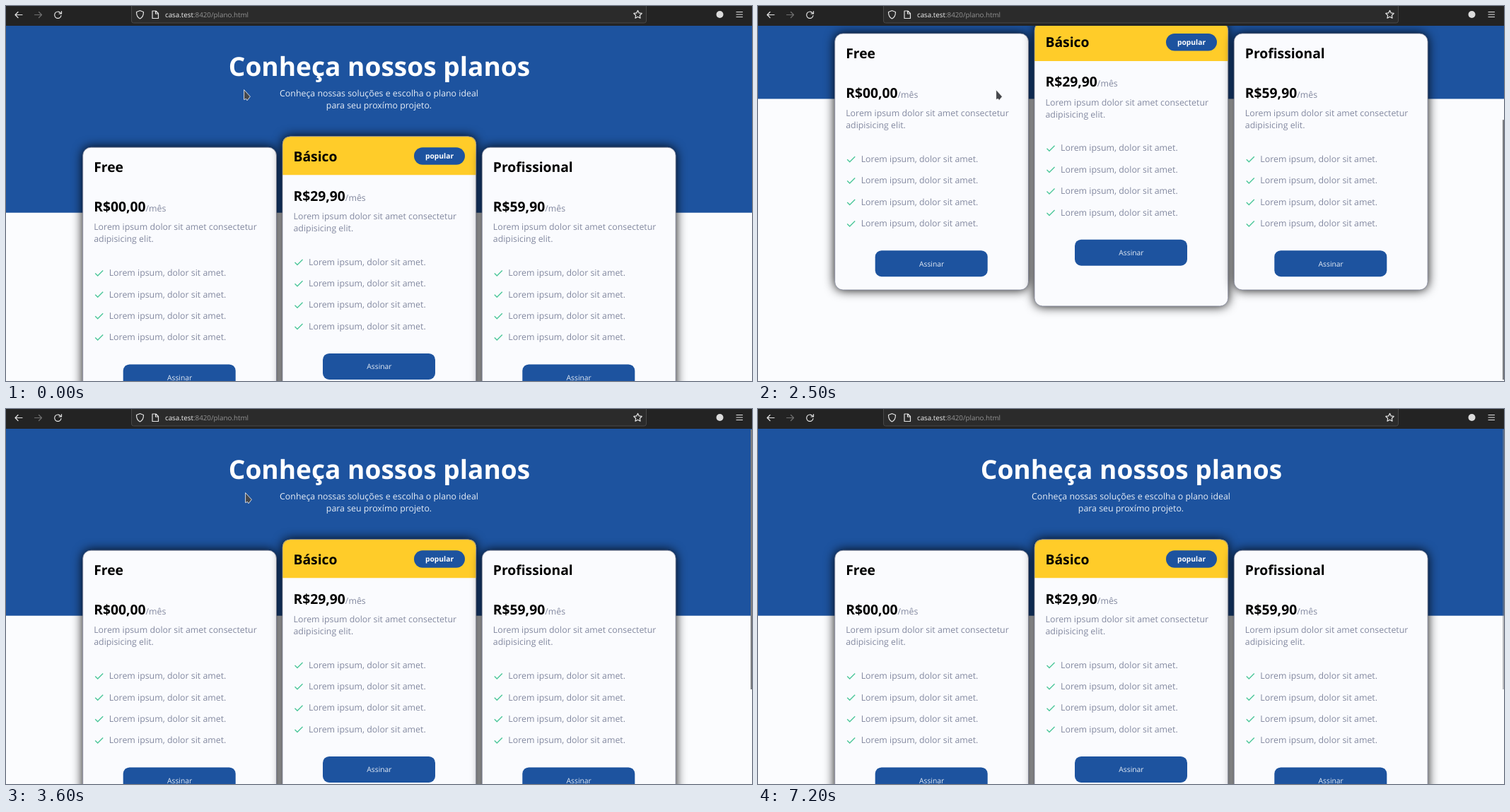
Animation, 1055 px wide and 531 px high, one loop 7.3 s. Source, as an HTML page:

```html
<!DOCTYPE html>
<html lang="pt-BR">
<head>
<meta charset="utf-8">
<title>Planos</title>
<style>
  html, body { margin: 0; width: 100%; height: 100%; overflow: hidden; background: #fbfcfe; }
  svg { display: block; }
  text { font: 12.36px "Open Sans", "Noto Sans", sans-serif; text-rendering: geometricPrecision; white-space: pre; }
  .mid { text-anchor: middle; }
  .hero { font-size: 37.1px; font-weight: 700; fill: #fff; }
  .sub { fill: #e6edf6; }
  .big { font-size: 19.3px; font-weight: 700; fill: #000; }
  .muted { fill: #8389a0; font-size: 12.36px; font-weight: 400; }
  .small { font-size: 10.3px; fill: #e6edf6; }
  .pill { font-size: 10.3px; font-weight: 700; fill: #fff; }
  .url { font-size: 9.8px; fill: #f2f2f2; }
  .blue { fill: #1d539f; }
  .panel { fill: #fafbfe; filter: drop-shadow(0 0 7.7px #000); }
  .edge { fill: none; stroke: #868a9e; stroke-width: .8; }
  .tick { fill: none; stroke: #4cc79a; stroke-width: 1.4; }
  .icons { fill: none; stroke: #e4e4e4; stroke-width: 1.2; stroke-linecap: round; stroke-linejoin: round; }
</style>
</head>
<body>
<svg width="1055" height="531" viewBox="0 0 1055 531">
  <rect width="1055" height="531" fill="#fbfcfe"/>
  <g id="page">
    <rect class="blue" width="1055" height="292.7"/>
    <text class="hero mid" x="528" y="98.5">Conheça nossos planos</text>
    <text class="sub mid" x="527.5" y="127.5">Conheça nossas soluções e escolha o plano ideal</text>
    <text class="sub mid" x="527.5" y="144.5">para seu proxímo projeto.</text>
    <g id="cards"></g>
  </g>
  <rect id="thumb" x="1053" y="29" width="2" height="368" fill="#7c7e82"/>

  <rect width="1055" height="28" fill="#232323"/>
  <rect x="177.5" y="-4" width="728" height="28" rx="3" fill="#2b2b2b" stroke="#484848"/>
  <text class="url" x="225" y="15.6">casa.test<tspan fill="#949494">:8420/plano.html</tspan></text>
  <g class="icons">
    <path id="arrow" d="M23 12.5H13m4-4l-4 4 4 4"/>
    <use href="#arrow" transform="matrix(-1 0 0 1 63.5 0)" opacity=".4"/>
    <path d="M77.5 10.5a4.7 4.7 0 1 0 .5 3m.5-6v3.5H75"/>
    <path d="M189.5 6.5l5 2q0 7-5 9.5-5-2.500-5-9.500z"/>
    <path d="M207 7h5l3.500 3.500v7H207zm4.500 0v4h4"/>
    <polygon id="star"/>
    <path d="M1033 8.500h8.500m-8.500 3.500h8.500m-8.500 3.500h8.500"/>
  </g>
  <circle cx="1009.5" cy="12" r="5" fill="#dcdcdc"/>
  <path id="cursor" d="M.6 .6V14.6L3.600 13.400 5 15.800 9.400 10.200z" fill="#45474c" stroke="#fff" stroke-width=".8" stroke-linejoin="round"/>
</svg>
<script>
const $ = id => document.getElementById(id);
const cardWidth = 273.8, cardGap = 282.3, padding = 15.5, radius = 11.5;

function card(column, y, height, name, price, popular) {
  const line = (y, style, text, x = padding) => `<text class="${style}" x="${x}" y="${y}">${text}</text>`;
  const box = style => `<rect class="${style}" width="${cardWidth}" height="${height}" rx="${radius}"/>`;
  const item = (_, i) => {
    const y = 182 + i * 30.4;
    return `<path class="tick" d="M17.5 ${y - 3.8}l3.500 3.500 7.500-7.500"/>` +
      line(y, 'muted', 'Lorem ipsum, dolor sit amet.', 37);
  };
  const banner = `<path d="M0 54.5V${radius}q0-${radius} ${radius}-${radius}H${cardWidth - radius}q${radius} 0 ${radius} ${radius}v43z" fill="#ffcc29"/>
    <rect class="blue" x="186" y="15.5" width="72" height="24.5" rx="12.2"/>` +
    line(31.5, 'pill mid', 'popular', 222);
  return `<g transform="translate(${108.7 + column * cardGap} ${y})">
    ${box('panel')}${popular ? banner : ''}${box('edge')}
    ${line(35, 'big', name)}
    ${line(91, 'big', `R$${price}<tspan class="muted">/mês</tspan>`)}
    ${line(117.3, 'muted', 'Lorem ipsum dolor sit amet consectetur')}
    ${line(134.3, 'muted', 'adipisicing elit.')}
    ${Array.from({ length: 4 }, item).join('')}
    <rect class="blue" x="57" y="307.2" width="159" height="37" rx="9"/>
    ${line(329.7, 'small mid', 'Assinar', cardWidth / 2)}
  </g>`;
}

$('cards').innerHTML =
  card(0, 200.2, 363, 'Free', '00,00') +
  card(1, 184.7, 401.5, 'Básico', '29,90', true) +
  card(2, 200.2, 363, 'Profissional', '59,90');

$('star').setAttribute('points', Array.from({ length: 10 }, (_, i) => {
  const r = i % 2 ? 3 : 6, angle = i * Math.PI / 5;
  return [893.5 + r * Math.sin(angle), 12.3 - r * Math.cos(angle)];
}).join(' '));

const easeOut = p => 1 - (1 - p) ** 3;
const easeInOut = p => p * p * (3 - 2 * p);

function draw(now) {
  const t = Math.floor(now % 7300 / 100) * 100; // the screen refreshes ten times a second
  const ramp = (start, duration) => Math.min(1, Math.max(0, (t - start) / duration));
  const after = time => t >= time;

  // two wheel turns down, one long one back up
  const scroll = 107.3 * easeOut(ramp(1620, 80)) + 57.7 * easeOut(ramp(2333, 280))
    - 165 * easeInOut(ramp(3389, 211));
  $('page').setAttribute('transform', `translate(0 ${-scroll})`);

  const barShown = after(1700) && !after(4800) || after(6000);
  $('thumb').setAttribute('opacity', barShown ? (after(7200) ? .5 : 1) : 0);
  $('thumb').setAttribute('transform', `translate(0 ${scroll * .82})`);

  // the pointer jumps towards the toolbar, then leaves over the top edge
  const leave = ramp(6100, 200);
  const x = 336 + 2 * after(3400) - 180 * after(6000) - 82 * leave;
  const y = 118 - 93 * after(6000) - 36 * leave - 20 * after(6500);
  $('cursor').setAttribute('transform', `translate(${x} ${y})`);
  requestAnimationFrame(draw);
}
draw(performance.now());
</script>
</body>
</html>
```
